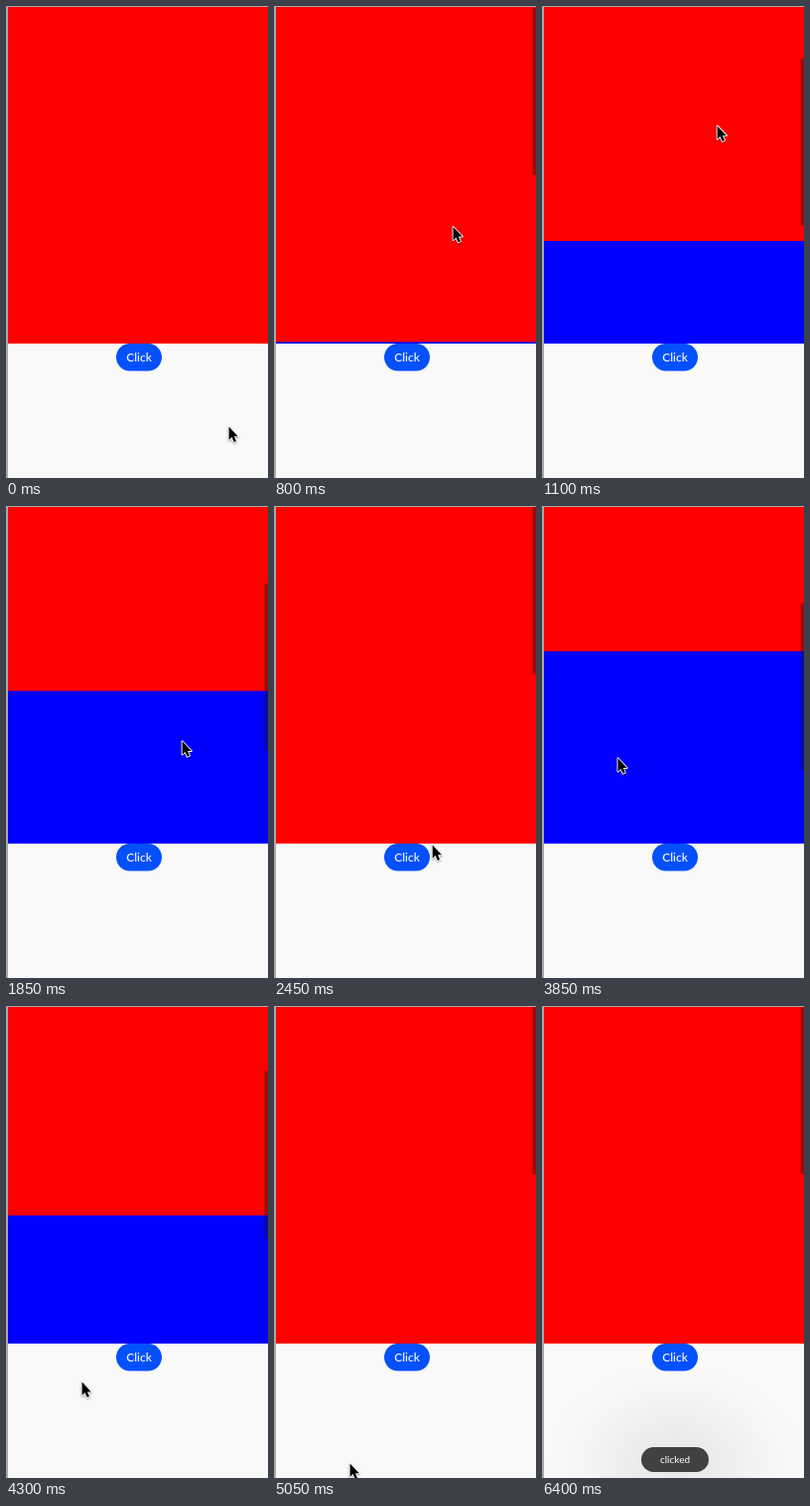
An HTML page with a canvas that plays this animation: 264 by 474 pixels, repeating every 6.95 s.

```html
<!DOCTYPE html>
<html lang="en">
<head>
<meta charset="utf-8">
<title>Scroll and click</title>
<style>
  html, body { margin: 0; width: 100%; height: 100%; overflow: hidden; background: #f9f9f9; }
  canvas { display: block; width: 264px; height: 474px; }
</style>
</head>
<body>
<canvas id="stage"></canvas>
<script>
const W = 264, H = 474, LOOP = 6950, STEP = 50;
const TOP = 1, VIEW = 338, LEFT = 2, CENTER = 134, REACH = 206;
const canvas = document.getElementById('stage');
const ctx = canvas.getContext('2d');
const dpr = window.devicePixelRatio || 1;
canvas.width = W * dpr;
canvas.height = H * dpr;
ctx.scale(dpr, dpr);

const mix = (a, b, u) => a + (b - a) * u;

// Cubic ease in and out, from 0 at `from` to 1 at `to`.
function ease(t, from, to) {
  const u = Math.min(1, Math.max(0, (t - from) / (to - from)));
  return u < 0.5 ? 4 * u ** 3 : 1 - 4 * (1 - u) ** 3;
}

// Each leg eases the pointer to a new resting place.
const legs = [
  { from: 0, to: 500, x: 180, y: 222 },
  { from: 700, to: 1500, x: 172, y: 16 },
  { from: 1500, to: 2100, x: 179, y: 324 },
  { from: 2100, to: 3100, x: 63, y: 412 },
  { from: 3250, to: 3950, x: 76, y: 250 },
  { from: 3950, to: 4600, x: 76, y: 458 },
  { from: 5050, to: 5500, x: 133, y: 353 },
  { from: 5800, to: 6300, x: 137, y: 482 },
];

function pointerAt(t) {
  return legs.reduce((p, leg) => {
    const u = ease(t, leg.from, leg.to);
    return { x: mix(p.x, leg.x, u), y: mix(p.y, leg.y, u) };
  }, { x: 224, y: 421 });
}

// A swipe pushes the list up for 800 ms; a second one pulls it back.
const swipe = (t, up, down, end) => REACH * (ease(t, up, up + 800) - ease(t, down, end));
const scrollAt = t => swipe(t, 700, 1700, 2075) + swipe(t, 3250, 4050, 4600);

function pill(x, y, w, h, color, r = h / 2) {
  ctx.fillStyle = color;
  ctx.beginPath();
  ctx.roundRect(x, y, w, h, r);
  ctx.fill();
}

function label(text, x, y, size, color) {
  ctx.font = `500 ${size}px Lato, "Open Sans", sans-serif`;
  ctx.textAlign = 'center';
  ctx.fillStyle = color;
  ctx.fillText(text, x, y);
}

function drawList(t) {
  const offset = scrollAt(t);
  ctx.fillStyle = '#ff0000';
  ctx.fillRect(LEFT, TOP, W, VIEW);
  ctx.fillStyle = '#0000ff';
  ctx.fillRect(LEFT, TOP + VIEW - offset, W, offset);
  if (t > 700) pill(260.5, TOP + offset / 2, 5, VIEW / 2 - 1, 'rgba(20, 20, 25, 0.4)', 1.5);
}

function drawButton(t) {
  const pressed = t >= 5600 && t < 5750;
  pill(111, 339, 46, 27.5, pressed ? '#0648de' : '#0450fb');
  label('Click', CENTER, 357, 12, '#fff');
}

function drawShadow() {
  const r = 104, glow = ctx.createRadialGradient(0, 0, 0, 0, 0, r);
  for (let u = 0; u <= 1; u += 0.125) {
    glow.addColorStop(u, `rgba(0, 0, 0, ${0.065 * (1 - u * u) ** 2})`);
  }
  ctx.save();
  ctx.scale(1.3, 1);
  ctx.fillStyle = glow;
  ctx.fillRect(-r, -r, 2 * r, 2 * r);
  ctx.restore();
}

function drawToast(t) {
  const shown = ease(t, 5700, 6050);
  ctx.save();
  ctx.globalAlpha = shown;
  ctx.translate(CENTER, 470 - 10 * shown);
  drawShadow();
  pill(-34, -17, 68, 25, '#414141');
  label('clicked', 0, -1, 10, '#f2f2f2');
  ctx.restore();
}

function drawFrame() {
  ctx.fillStyle = '#aaa7a7';
  ctx.fillRect(0, 0, W, TOP);
  ctx.fillRect(0, 0, LEFT, H);
}

const arrow = new Path2D('M0 0V13.4L3 10.6 5.1 15.5 7.4 14.5 5.4 9.8H9.3Z');

function drawPointer(t) {
  const { x, y } = pointerAt(t);
  ctx.save();
  ctx.translate(x + 0.6, y + 1.4);
  ctx.lineJoin = 'round';
  ctx.lineWidth = 1.8;
  ctx.strokeStyle = '#fff';
  ctx.shadowColor = 'rgba(0, 0, 0, 0.35)';
  ctx.shadowBlur = 2 * dpr;
  ctx.shadowOffsetY = dpr;
  ctx.stroke(arrow);
  ctx.shadowColor = 'transparent';
  ctx.fillStyle = '#000';
  ctx.fill(arrow);
  ctx.restore();
}

function draw(t) {
  ctx.fillStyle = '#f9f9f9';
  ctx.fillRect(0, 0, W, H);
  drawToast(t);
  drawList(t);
  drawButton(t);
  drawFrame();
  drawPointer(t);
}

const start = performance.now();
function tick() {
  const t = (performance.now() - start) % LOOP;
  draw(Math.floor(t / STEP) * STEP);
  requestAnimationFrame(tick);
}
tick();
</script>
</body>
</html>
```
